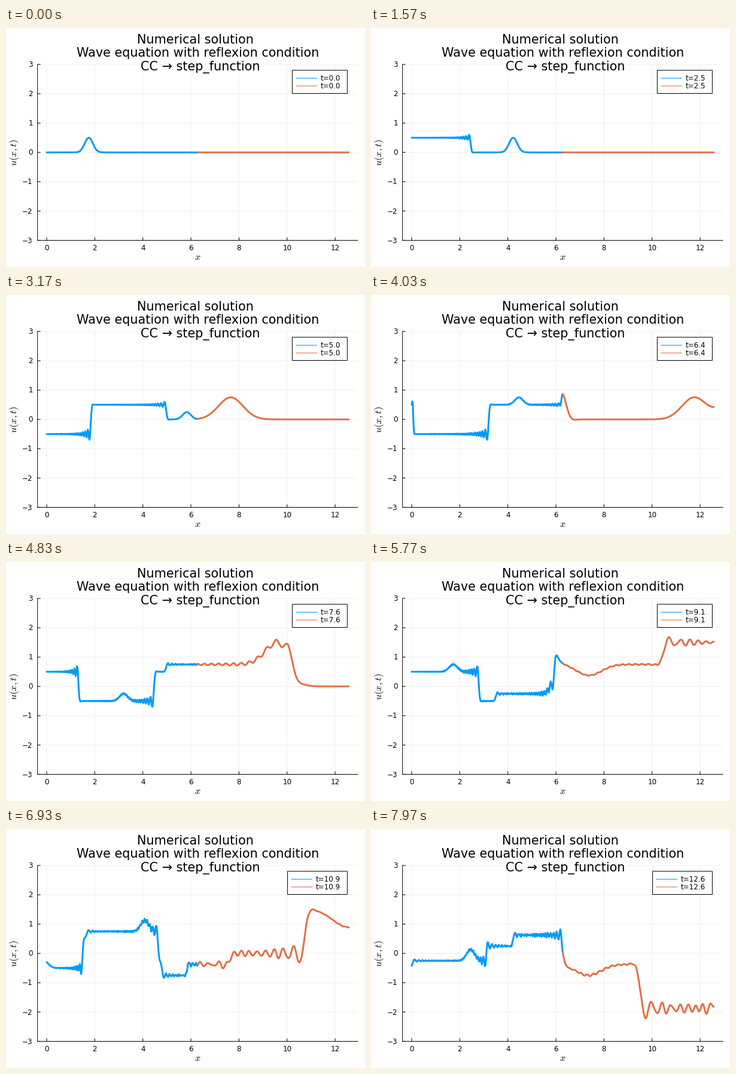
A matplotlib script for the animation above (8000 ms loop, 600 by 400 pixels).

```python
import numpy as np
import matplotlib.pyplot as plt
from matplotlib.animation import FuncAnimation
from matplotlib.patches import Rectangle

W, H, DPI = 600, 400, 100
TICKS, INTERVAL = 400, 20     # drawn frames and their length in ms
STATES = 240                  # wave states in one loop, three per five ticks
T_STEP = 5 * np.pi / 299
SUB = 30                      # solver steps per state
N = 500                       # cells on [0, 4 pi]
PAD = 120                     # extra cells left of 0 let waves leave freely
BLUE, ORANGE = "#009AFA", "#E36F47"
TICK_PX, TITLE_PX, LABEL_PX = 11.83, 20.78, 16.4

plt.rcParams["font.family"] = "DejaVu Sans"
plt.rcParams["mathtext.fontset"] = "cm"


# ---- wave solver -----------------------------------------------------------
DX = 4 * np.pi / N
X = np.arange(N + 1) * DX


def inflow(t):
    return 0.5 * np.sign(np.sin(t))


def pulse(x):
    return 0.5 * np.exp(-(x - 1.75) ** 2 / 0.058)


def d2(u):
    """Fourth-order second derivative: cubic ghost left, mirror right."""
    ghost = 4 * u[0] - 6 * u[1] + 4 * u[2] - u[3]
    p = np.concatenate(([ghost, ghost], u, u[-2:-4:-1]))
    return (-p[:-4] + 16 * p[1:-3] - 30 * p[2:-2]
            + 16 * p[3:-1] - p[4:]) / (12 * DX ** 2)


def solve():
    dt = T_STEP / SUB
    mid = N // 2
    c2 = np.where(np.arange(N + 1) < mid, 1.0, 9.0)
    c2[mid] = 1.8             # harmonic mean at the interface
    c2_pad = np.concatenate((np.ones(PAD), c2))

    # incoming wave in a uniform medium, plus the field it scatters
    a, a_old = pulse(X), pulse(X + dt)
    s = np.zeros(N + 1 + PAD)
    s_old = s.copy()
    states = []
    for i in range(STATES * SUB):
        if i % SUB == 0:
            states.append(a + s[PAD:])
        axx = d2(a)
        force = c2_pad * d2(s)
        force[PAD:] += (c2 - 1) * axx
        a, a_old = 2 * a - a_old + dt ** 2 * axx, a
        s, s_old = 2 * s - s_old + dt ** 2 * force, s
        a[0] = inflow((i + 1) * dt)
        s[0] = 0
    return states


# ---- stage -----------------------------------------------------------------
def px(x):
    return 68.05 + 40.17 * x


def py(y):
    return 208.2 - 49.07 * y


def pt(pixels):
    return pixels * 72 / DPI


fig = plt.figure(figsize=(W / DPI, H / DPI), dpi=DPI, facecolor="white")
ax = fig.add_axes([0, 0, 1, 1])
ax.set_xlim(0, W)
ax.set_ylim(H, 0)
ax.axis("off")


def line(xs, ys, color="black", width=1.0, z=2, cap="butt", **kw):
    return ax.plot(xs, ys, color=color, lw=pt(width), zorder=z, snap=False,
                   solid_capstyle=cap, **kw)[0]


def label(x, y, s, size=TICK_PX, ha="center", va="baseline", **kw):
    return ax.text(x, y, s, fontsize=pt(size), ha=ha, va=va, zorder=8, **kw)


LEFT, RIGHT, TOP, BOTTOM = 52.7, 588.0, py(3), py(-3)

for v in range(0, 13, 2):
    line([px(v)] * 2, [TOP, BOTTOM], "#f0f0f0", z=1)
    line([px(v)] * 2, [BOTTOM, BOTTOM - 5])
    label(px(v), 371.6, str(v))
for v in range(-3, 4):
    line([LEFT, RIGHT], [py(v)] * 2, "#f0f0f0", z=1)
    line([LEFT, LEFT + 5], [py(v)] * 2)
    label(44.8, py(v) + 4.2, str(v).replace("-", "\u2212"), ha="right")
line([LEFT, LEFT], [TOP, BOTTOM], cap="projecting")
line([LEFT, RIGHT], [BOTTOM, BOTTOM], cap="projecting")

title = ("Numerical solution",
         "Wave equation with reflexion condition",
         "CC \u2192 step_function")
for k, row in enumerate(title):
    label(316 + 4.4 * k, 25.5 + 23 * k, row, TITLE_PX)
label(320.2, 388.3, "$x$", LABEL_PX)
label(13.5, 208.5, "$u(x,t)$", LABEL_PX, va="center", rotation=90)

curves = [line([], [], c, 3, z=4 + k, cap="round", solid_joinstyle="round")
          for k, c in enumerate((BLUE, ORANGE))]

box = Rectangle((478.4, 70.7), 92, 38.8, fc="white", ec="black", lw=pt(1),
                zorder=6, snap=False)
ax.add_patch(box)
keys = [line([], [], c, 1.1, z=7) for c in (BLUE, ORANGE)]
notes = [label(526, y, "", ha="left") for y in (88.4, 101.3)]

states = solve()
HALVES = (slice(0, N // 2 + 1), slice(N // 2, N + 1))


def draw(n):
    i = (3 * n + 2) // 5
    u = states[i]
    text = f"t={i * T_STEP:.1f}"
    x0 = 478.4 - 7.8 * (len(text) - 5)
    box.set_x(x0)
    box.set_width(570.4 - x0)
    for k, half in enumerate(HALVES):
        curves[k].set_data(px(X[half]), py(u[half]))
        keys[k].set_data([x0 + 6, x0 + 41.5], [84.1 + 12.9 * k] * 2)
        notes[k].set_text(text)
        notes[k].set_x(x0 + 47.4)
    return curves + keys + notes + [box]


anim = FuncAnimation(fig, draw, frames=TICKS, interval=INTERVAL,
                     init_func=lambda: draw(0), repeat=True, repeat_delay=0,
                     blit=False)
plt.show()
```
